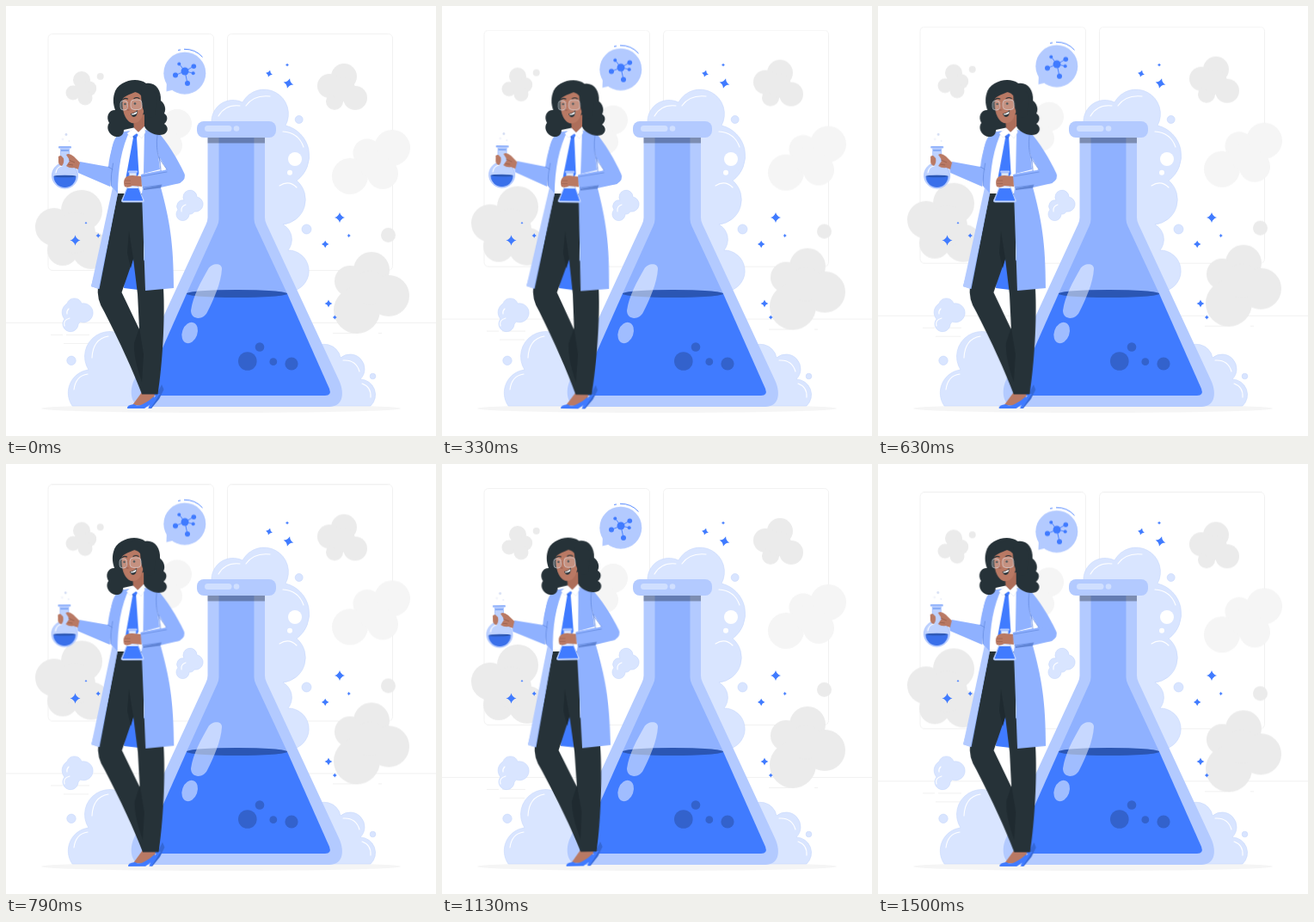
An HTML page for the animation above (1.54 s loop, 500 by 500 pixels).

```html
<!DOCTYPE html>
<html lang="en">
<head>
<meta charset="utf-8">
<title>Scientist with flasks</title>
<style>
  html, body { margin: 0; width: 100%; height: 100%; overflow: hidden; background: #fff; }
  svg { display: block; width: 100%; height: 100%; }
  .float { animation: float 1540ms -50ms linear infinite; }
  .sway { transform-origin: 130px 277px; animation: sway 1540ms -50ms linear infinite; }
  @keyframes float {
    0%, 100% { transform: translateY(.5px); }
    50% { transform: translateY(-9.5px); }
  }
  @keyframes sway {
    0%, 50%, 100% { transform: rotate(-.15deg); }
    25% { transform: rotate(.85deg); }
    75% { transform: rotate(-1.15deg); }
  }
  .main { fill: #407bff; }
  .mid { fill: #8fb1ff; }
  .soft { fill: #b3caff; }
  .dark { fill: #263238; }
  .skin { fill: #b97964; }
  .grey { fill: #ebebeb; }
  .pale { fill: #f5f5f5; }
  .mist { fill: #d9e5ff; stroke: #c6d7fc; stroke-width: .6; }
  .line { fill: none; stroke: #f1f1f1; }
  .shine { fill: none; stroke: #fff; stroke-width: 1.1; stroke-linecap: round; }
  .ink { fill: none; stroke: #263238; stroke-width: 1.2; stroke-linecap: round; }
  .fold { fill: none; stroke: #5f86dc; stroke-width: .7; stroke-linecap: round; }
  .bond { fill: none; stroke: #407bff; stroke-width: .9; }
</style>
</head>
<body>
<svg viewBox="0 0 500 500">
  <g class="float">
    <g class="line">
      <rect x="49" y="32.5" width="192.5" height="275" rx="5"/>
      <rect x="257.5" y="32.5" width="192" height="275" rx="5"/>
      <path d="M0 368.5H500M52 382.5H66M70 382.5H97M67 392.5H96M380 380.5H410M433 380.5H437"/>
    </g>
    <g id="puffs"></g>
    <path class="soft" d="M187 85L186.5 99.5L197 97Z"/>
    <circle class="soft" cx="207.8" cy="78.2" r="24.5"/>
    <path class="bond" d="M200 51.5L203 51M207 50.3Q220 50 228.5 59.5"/>
    <path class="bond" d="M201.5 67.5L208 76L218.5 70M197 80.5L208 76L217.7 78.2M208 76L211 90"/>
    <g class="main">
      <circle cx="208" cy="76" r="4.5"/>
      <circle cx="201.3" cy="67.5" r="2"/>
      <circle cx="218.3" cy="70.2" r="2.8"/>
      <circle cx="217.7" cy="78.2" r="2"/>
      <circle cx="197" cy="80.6" r="3"/>
      <circle cx="211" cy="90" r="3"/>
    </g>
  </g>

  <ellipse class="pale" cx="250" cy="468" rx="209" ry="5"/>

  <g class="mist">
    <path d="M239 136A25 25 0 0 1 275 112A27 27 0 1 1 325 139A36 36 0 0 1 338 203A29 29 0 0 1 322 254A20 20 0 0 1 328 284A24 24 0 0 1 335 331H250Z"/>
    <path d="M77 465A27 27 0 0 1 96 423A27 27 0 1 1 145 392L185 465Z"/>
    <path d="M355 401A19 19 0 0 1 389 409A17 17 0 0 1 412 434A18 18 0 0 1 424 465H355Z"/>
    <path d="M207 226A8 8 0 1 1 222 222A8.5 8.5 0 1 1 219 239A6 6 0 0 1 213 242A7.5 7.5 0 1 1 200 237A7 7 0 0 1 207 226Z"/>
    <path d="M71 346A9 9 0 0 1 88 346A11 11 0 1 1 86 367A8 8 0 0 1 84 370A9 9 0 1 1 68 364A12 12 0 0 1 71 346Z"/>
    <circle cx="340.7" cy="132" r="4.5"/>
    <circle cx="349.5" cy="259.5" r="5.5"/>
    <circle cx="426.5" cy="430.5" r="3.3"/>
    <circle cx="76" cy="412.3" r="5.2"/>
  </g>
  <circle cx="336" cy="178" r="8" fill="#fff"/>
  <circle cx="330" cy="193.7" r="3" fill="#fff"/>
  <g class="shine">
    <path d="M247 128Q255 114 272 116M279 116Q288 103 307 105M322 146Q340 147 346 164M318 209Q329 202 338 211"/>
    <path d="M79 446Q81 430 95 428M100 409Q101 387 119 384M392 412Q407 411 411 425M414 439Q425 443 424 455"/>
    <path d="M204 239Q203 233 209 231M68 372Q66 365 74 363M73 352Q70 355 71 358"/>
  </g>

  <g class="main" id="sparks"></g>

  <path class="soft" d="M234.500 150V246Q234.500 250 232.500 254L148 437C143 450 146 466 160 466H376C391 466 394 452 388 437L303 254Q301 250 301 246V150Z"/>
  <path class="mid" d="M247.500 153V248Q247.500 252 245.500 256L210 334.500H327L290.500 256Q288.500 252 288.500 248V153Z"/>
  <path class="main" d="M210 334.500L161 445Q158 453 166 453H371Q379 453 376 445L327 334.500Z"/>
  <ellipse cx="268.5" cy="334.5" rx="58.5" ry="4.6" fill="#2b56b3"/>
  <path d="M235 306C239 299 251 298 251 306C250 322 242 340 234 356C229 366 215 365 215 354C217 338 227 320 235 306Z" fill="#fff" opacity=".5"/>
  <ellipse cx="213.7" cy="380" rx="8.8" ry="12.5" transform="rotate(20 213.7 380)" fill="#fff" opacity=".5"/>
  <g fill="#3362cc">
    <circle cx="280.8" cy="413" r="10.8"/>
    <circle cx="295" cy="396.5" r="5.3"/>
    <circle cx="310.8" cy="413.7" r="4.4"/>
    <circle cx="332" cy="416" r="7.6"/>
  </g>
  <rect x="234.5" y="152" width="66.5" height="7.5" opacity=".3"/>
  <rect class="soft" x="222" y="134" width="92" height="19" rx="8"/>
  <rect x="231" y="139" width="31.5" height="7" rx="3.5" fill="#d0dfff"/>
  <circle cx="268" cy="142.5" r="3.3" fill="#d0dfff"/>

  <g class="sway">
    <!-- shoes -->
    <path d="M176 450L181 440L183.500 446L178 457L169 468H165.500Z" fill="#3467d6"/>
    <path class="skin" d="M158 449H173L172 457L160 465L147 464Z"/>
    <path class="main" d="M141 468Q140 464 149 463Q153 466 159 463Q167 459 172 454L173 460Q166 464 161 468Z"/>
    <path class="main" d="M179 451L168 468H165.500L168 461L176 451Z"/>

    <!-- coat lining and trousers -->
    <path class="main" d="M140 285H160L162 331L137 328Z"/>
    <path class="dark" d="M128 216H160V295L183 328C185 365 182 415 176.500 451.500H158C148 425 133 392 114 355Q105 341 107 326C114 297 123 260 128 216ZM148 294L134.500 333L155 376L153 335Z" fill-rule="evenodd"/>
    <path d="M155 374L149 392Q148 409 158 437L160 405ZM143 262L141 287L145 305L148 294Z" fill="#1f2a30"/>

    <!-- shirt and tie -->
    <path d="M135 148L150 143L162 145L161 218H128Z" fill="#fff"/>
    <path class="main" d="M146 148L150 146.500L154 149L152 153L154.500 195L147 209L139.500 199L148 153Z"/>
    <path d="M149 150.500L148 153H152" fill="none" stroke="#2e5fd0" stroke-width=".7"/>

    <!-- coat -->
    <path class="mid" d="M144 145L133 147Q122 154 121 185L122 209L128 218L99 326L108.500 329L130 218Q130 174 144 145Z"/>
    <path class="soft" d="M124 211L99 326L107.500 329L130 218Z"/>
    <path class="mid" d="M161 144L176 146C187 157 200 179 207 194Q210 201 202 206L180 211C190 248 195 275 195 328L162 331L158 218L159 211L157 196L181 191L178 177L176 166L179 190L160 195Z"/>
    <path d="M179 177L187 190L181 192Z" fill="#fff"/>
    <path class="mid" d="M157 196L190 190L207 194Q210 201 202 206L159 211Q156 204 157 196Z"/>
    <path class="fold" d="M159 211L181 208M178 176L180 191M176 150Q174 165 178 177L187 190M187 193L158 198"/>
    <path d="M160 212L181 208L180 211.500L160 214Z" fill="#5f83d3"/>
    <path class="mid" d="M126 157Q120 174 119 187L86 181Q82 187 84 194L121 210Q124 188 126 157Z"/>
    <path class="fold" d="M124.500 183Q122 195 122 209M119 187L124 190"/>

    <!-- round flask -->
    <path d="M63.500 166V183A15 15 0 1 0 73.500 183V166Z" fill="#b3caff" opacity=".85" stroke="#91b2ff" stroke-width=".8"/>
    <path d="M55.500 198H81.500A13 13 0 0 1 55.500 198Z" fill="#3a70ea"/>
    <ellipse cx="68.5" cy="198" rx="13" ry="1.3" fill="#2b56b3"/>
    <path d="M58 194Q59 187 65 186" class="shine"/>
    <rect x="61" y="163" width="15" height="2.5" rx="1" fill="#94b4fb"/>
    <path d="M64 168H73" stroke="#618fee" stroke-width="1.2"/>
    <g fill="#d3dcf3">
      <circle cx="70" cy="149.5" r="1.4"/>
      <circle cx="73.5" cy="157" r=".9" opacity=".6"/>
      <circle cx="66" cy="155" r="1.4" opacity=".3"/>
    </g>
    <path class="skin" d="M86 182L79 175Q73 170 70 173Q73 177 74 180L70 186Q74 189 79 188L84 190ZM61 177Q60 174 64 174L67 177Q68 183 65 186Q61 185 61 181Z"/>
    <path d="M73 179L80 182M72 184L78 185" fill="none" stroke="#895444" stroke-width=".6"/>

    <!-- conical flask -->
    <path d="M143.500 194V205L134.500 226Q134 228 136 228H159Q161 228 160.500 226L151.500 205V194Z" fill="#dce7ff" stroke="#a8c3ff" stroke-width=".8"/>
    <path class="main" d="M141 212H154L159.500 226.500H135.500Z"/>
    <rect class="soft" x="142" y="191.5" width="11" height="2.3" rx="1"/>
    <path class="skin" d="M157 198L147 197Q140 197 138 201Q136 205 138 210Q142 212 147 209L158 210Z"/>
    <path d="M138 203H145M138 206.500H145" stroke="#965d4c" stroke-width=".6"/>

    <!-- head -->
    <path class="dark" d="M150 86C140 86 128 92 126 102C124 109 125 115 127 121C119 121 116 129 120 136C115 143 122 153 131 152C136 151 137 147 137 144L160 139C165 148 176 152 184 149C189 146 189 140 184 137C189 133 188 127 184 125C187 119 184 113 180 110C181 97 173 88 163 90C159 87 155 86 150 86Z"/>
    <path d="M148 130L161 126L161 143Q155 149 149 146Z" fill="#ad6e5a"/>
    <path d="M141 148L149 142L154 147L161 140L162 147L158 154L152 148L145 153Z" fill="#fff" stroke="#dde5f5" stroke-width=".5"/>
    <path class="skin" d="M136 106C134 120 138 133 146 136C155 138 161 129 161 114C160 104 153 99 146 100C140 101 137 103 136 106Z"/>
    <path class="dark" d="M134 111C137 103 146 103 157 97C157 110 158 120 162 125C164 130 169 132 173 127L176 103L157 88L137 93Z"/>
    <path class="ink" d="M136.500 108.500Q138.500 106.500 141.500 108M149 107.500Q152 105.500 155 107.500"/>
    <path d="M142 113L140.500 121H143.500" fill="none" stroke="#8c5142" stroke-width=".8"/>
    <path d="M145 125Q149 125 153 121Q153 128 149 129Q146 129 145 125Z" class="dark"/>
    <path d="M146 125.500Q149 125 152.500 122.500L152 125Q149 127 146 126.500Z" fill="#fff"/>
    <circle class="dark" cx="138.5" cy="114" r="1.2"/>
    <circle class="dark" cx="150" cy="113.5" r="1.3"/>
    <g fill="#fff" fill-opacity=".18" stroke="#e4e9f2" stroke-opacity=".7" stroke-width=".8">
      <rect x="133" y="110" width="8.5" height="11" rx="3.5"/>
      <rect x="145" y="109" width="13" height="11.5" rx="4"/>
    </g>
  </g>
</svg>
<script>
  const NS = 'http://www.w3.org/2000/svg';
  const add = (id, tag, attrs) => {
    const el = document.createElementNS(NS, tag);
    for (const k in attrs) el.setAttribute(k, attrs[k]);
    document.getElementById(id).append(el);
  };

  const puff = (cls, ...spots) =>
    spots.forEach(([cx, cy, r]) => add('puffs', 'circle', { class: cls, cx, cy, r }));
  puff('grey', [88, 86, 10], [96.5, 96, 8.7], [92, 107, 8.5], [78, 101, 8.5], [88, 97, 9], [109.7, 82, 4]);
  puff('grey', [393, 82, 15], [376, 93, 14], [406, 107, 14], [382, 111, 10], [392, 97, 14]);
  puff('grey', [425, 307, 21], [400, 320, 18], [445, 337, 24], [408, 354, 27], [423, 328, 20], [444.5, 266.5, 8.5]);
  puff('grey', [88, 238, 24], [56, 257, 22], [66, 284, 18], [99, 284, 22], [80, 264, 24]);
  puff('pale', [449, 165, 21], [420, 171, 16.5], [400, 198, 21], [438, 195, 18], [426, 184, 16]);
  puff('pale', [199, 137, 17], [190, 162, 15]);

  const spark = (x, y, r, turn = 0) => add('sparks', 'path', {
    d: 'M0-1Q.22-.22 1 0Q.22.22 0 1Q-.22.22-1 0Q-.22-.22 0-1Z',
    transform: `translate(${x} ${y}) rotate(${turn}) scale(${r})`
  });
  spark(80.5, 272.5, 6);
  spark(107.2, 267, 2.8);
  spark(93, 252.3, 1.5);
  spark(388, 246, 6);
  spark(371.2, 277, 4.2);
  spark(398.7, 267, 2.2);
  spark(306, 78.7, 4, 15);
  spark(328.5, 90, 6, 15);
  spark(327, 68.5, 2);
  spark(375, 346, 4.5);
  spark(382.3, 362, 2.5);
</script>
</body>
</html>
```
